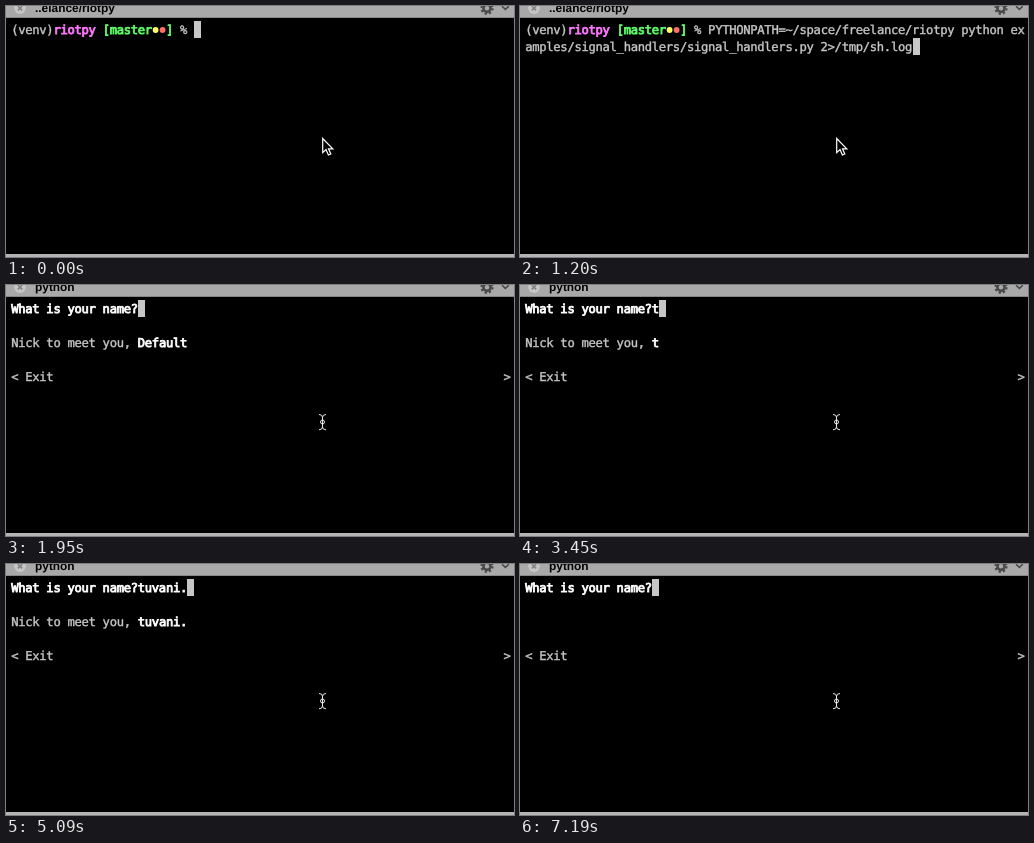
An HTML page for the animation above (8000 ms loop, 508 by 251 pixels).

```html
<!DOCTYPE html>
<html lang="en">
<head>
<meta charset="utf-8">
<title>Terminal session</title>
<style>
  html, body { margin: 0; width: 100%; height: 100%; overflow: hidden; background: #000; }
  svg { display: block; width: 100vw; height: 100vh; }
  text { white-space: pre; text-rendering: geometricPrecision; }
  .term {
    font: 12.2px "DejaVu Sans Mono", monospace; letter-spacing: -.305px;
    fill: #c7c7c7; stroke: #c7c7c7; stroke-width: .4px;
  }
  .term .b { fill: #fff; stroke: #fff; stroke-width: .85px; }
  .term .pink { fill: #ff77ff; stroke: #ff77ff; }
  .term .green { fill: #5ffa68; stroke: #5ffa68; }
  .title { font: bold 11.9px "Liberation Sans", Arial, sans-serif; fill: #000; }
</style>
</head>
<body>
<svg viewBox="0 0 508 251">
  <rect width="508" height="251"/>
  <g id="bar">
    <rect width="508" height="11.8" fill="#a9a9a9"/>
    <circle cx="14" cy="2.2" r="5.8" fill="#c6c6c6"/>
    <path d="M11.8 0l4.4 4.4m0-4.4l-4.4 4.4" stroke="#808080" stroke-width="1.5"/>
    <text id="title" class="title" x="29" y="6"></text>
    <g fill="none" stroke="#484848">
      <circle cx="481" cy="2.3" r="3.6" stroke-width="2.6"/>
      <circle cx="481" cy="2.3" r="5.6" stroke-width="2" stroke-dasharray="2.2 2.2"/>
      <path d="M496 .2l3.4 3.2l3.4-3.2" stroke-width="1.5"/>
    </g>
  </g>
  <rect y="248" width="508" height="3" fill="#b4b4b4"/>
  <g id="rows" class="term"></g>
  <g id="dots">
    <circle cx="149.6" cy="24" r="2.9" fill="#fffc67"/>
    <circle cx="156.6" cy="24" r="2.9" fill="#ff6e67"/>
  </g>
  <rect id="caret" width="7" height="17" fill="#c7c7c7"/>
  <path id="arrow" d="M316.7 132.5V146.6L320 143.6L322.4 149L324.8 148L322.5 142.8H326.8Z" fill="#000" stroke="#fff" stroke-width="1.2"/>
  <g id="beam" fill="none" stroke="#e8e8e8">
    <path d="M313 129.5Q316.5 129.5 316.5 132.5Q316.5 129.5 320 129.5M316.5 132V142M313 144.8Q316.5 144.8 316.5 141.8Q316.5 144.8 320 144.8"/>
    <circle cx="316.5" cy="137" r="2"/>
  </g>
</svg>
<script>
const LOOP = 8000, LEFT = 5.4, CELL = 7.04, LINE = 17;
const NS = "http://www.w3.org/2000/svg";
const $ = id => document.getElementById(id);

const COMMAND = "PYTHONPATH=~/space/freelance/riotpy python ex";
const REST = "amples/signal_handlers/signal_handlers.py 2>/tmp/sh.log";
const ANSWER = "tuvani.";
const PROMPT = [["(venv)"], ["riotpy", "b pink"], [" "], ["[master", "b green"],
  ["  "], ["]", "b green"], [" % "]];

// [start time, letters of the answer present]
const KEYS = [[1950, 0], [3450, 1], [3600, 2], [3750, 3], [3890, 5], [4790, 6], [5090, 7],
  [6290, 6], [6740, 5], [6890, 3], [7040, 1], [7190, 0]];

const rows = Array.from({ length: 5 }, (_, i) => {
  const row = document.createElementNS(NS, "text");
  row.setAttribute("x", LEFT - .2);
  row.setAttribute("y", 28 + i * LINE);
  return $("rows").appendChild(row);
});

function setRow(i, runs = []) {
  rows[i].replaceChildren(...runs.map(([str, cls]) => {
    const span = document.createElementNS(NS, "tspan");
    span.textContent = str;
    if (cls) span.setAttribute("class", cls);
    return span;
  }));
}

function setCaret(col, row) {
  $("caret").setAttribute("x", Math.round(LEFT + col * CELL));
  $("caret").setAttribute("y", 15 + row * LINE);
}

function show(id, on) {
  $(id).setAttribute("visibility", on ? "visible" : "hidden");
}

function drawShell(t) {
  const full = t >= 1200;
  const typed = full ? COMMAND : t >= 450 ? COMMAND.slice(0, 5) : "";
  setRow(0, [...PROMPT, [typed]]);
  setRow(1, full ? [[REST]] : []);
  for (const i of [2, 3, 4]) setRow(i);
  if (t >= 1800) setCaret(0, 2);
  else if (full) setCaret(REST.length, 1);
  else setCaret(26 + typed.length, 0);
}

function drawApp(t) {
  const count = KEYS.findLast(([at]) => t >= at)[1];
  const name = t < 3450 ? "Default" : ANSWER.slice(0, count);
  setRow(0, [["What is your name?" + ANSWER.slice(0, count), "b"]]);
  setRow(1);
  setRow(2, name ? [["Nick to meet you, "], [name, "b"]] : []);
  setRow(3);
  setRow(4, [["< Exit".padEnd(70) + ">"]]);
  setCaret(18 + count, 0);
}

function draw(t) {
  const app = t >= 1950;
  $("title").textContent = t < 1650 ? "..elance/riotpy" : "python";
  show("dots", !app);
  show("arrow", t < 1800);
  show("beam", t >= 1800);
  (app ? drawApp : drawShell)(t);
}

const start = performance.now();
function tick() {
  draw((performance.now() - start) % LOOP);
  requestAnimationFrame(tick);
}
tick();
</script>
</body>
</html>
```
